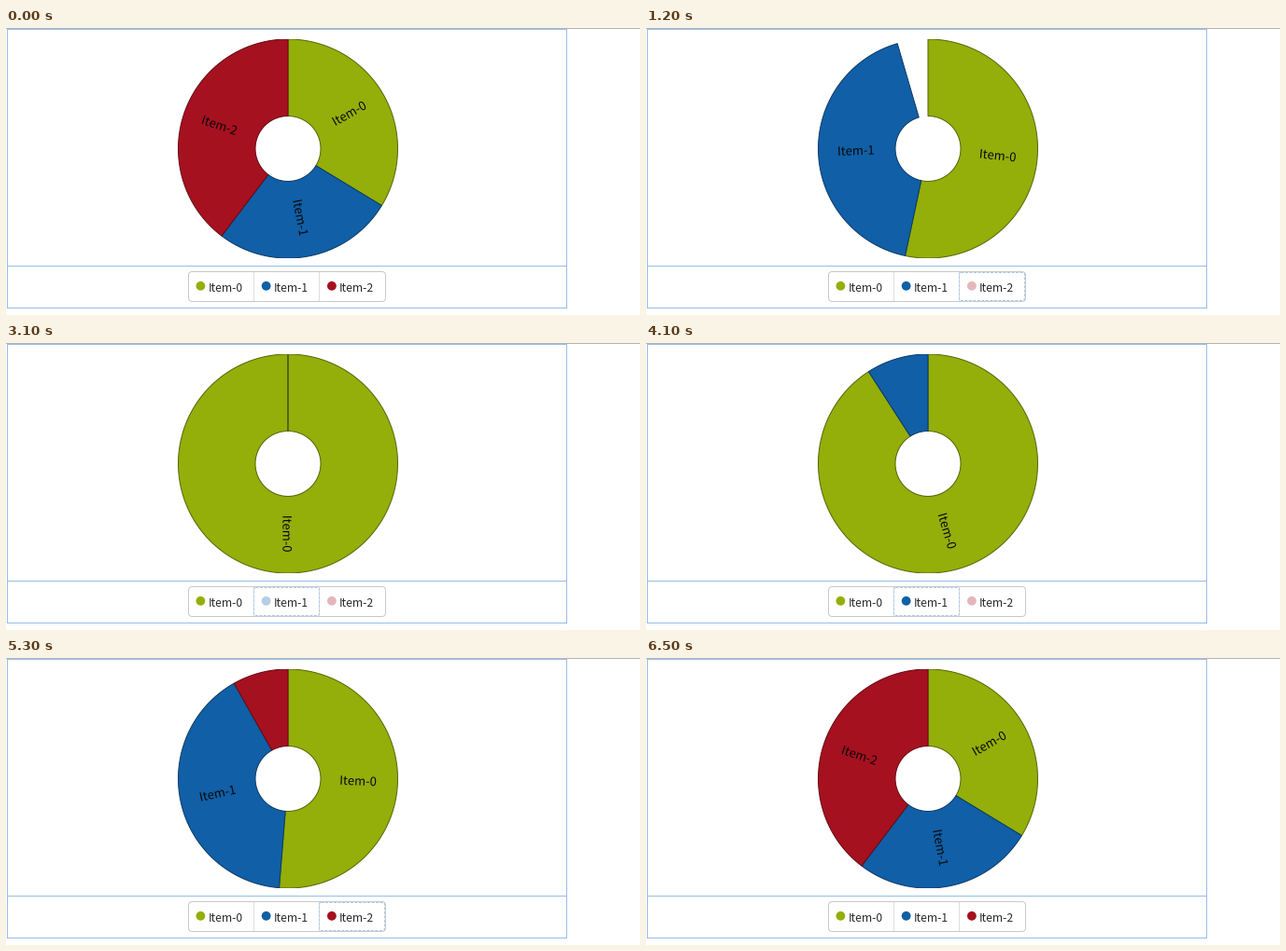
Write a matplotlib script that moves like this. It is 679 by 308 pixels and loops after 6.6 s.

```python
import numpy as np
import matplotlib.pyplot as plt
from matplotlib.animation import FuncAnimation
from matplotlib.patches import Circle, FancyBboxPatch, PathPatch, Polygon, Rectangle
from matplotlib.textpath import TextPath
from matplotlib.transforms import Affine2D

W, H, DPI = 679, 308, 64
STEP, LOOP = 100, 6600
PX = 72 / DPI  # points per pixel

CX, CY = 302, 129.5
R_IN, R_OUT = 35, 117.5
R_MID, R_CALLOUT = (R_IN + R_OUT) / 2, R_OUT + 40

BLUE = "#99bce8"
COLORS = ["#94ae0a", "#115fa6", "#a61120"]
EDGES = ["#566606", "#0b3a66", "#650a14"]
NAMES = ["Item-0", "Item-1", "Item-2"]
SWEEPS = [121.3, 95.9, 142.8]
FONT = "Noto Sans CJK JP"


def ends(count):
    """End angle of each slice, clockwise from the top, with `count` shown."""
    sums = np.cumsum(SWEEPS[:count])
    return np.append(sums * 360 / sums[-1], [360.0] * (3 - count))


# start ms, slices before, slices after, first phase, phase per step
MOVES = [
    (900, 3, 2, 0.125, 0.21875),
    (2700, 2, 1, 0.125, 0.21875),
    (4000, 1, 2, 0.1, 0.2),
    (5200, 2, 3, 0.1, 0.2),
]
# start ms, legend item that has the focus
FOCUS = [(0, None), (800, 2), (2600, 1), (5100, 2), (6500, None)]

plt.rcParams["toolbar"] = "None"
fig = plt.figure(figsize=(W / DPI, H / DPI), dpi=DPI, facecolor="white")
ax = fig.add_axes([0, 0, 1, 1])
ax.set_xlim(0, W)
ax.set_ylim(H, 0)
ax.axis("off")


def line(xs, ys, color, z=5):
    ax.plot(xs, ys, color=color, lw=PX, zorder=z, snap=False,
            solid_capstyle="butt")


def rounded(x0, y0, x1, y1, r, color, z, **kw):
    box = FancyBboxPatch((x0, y0), x1 - x0, y1 - y0, fc="none", ec=color,
                         boxstyle=f"round,pad=0,rounding_size={r}",
                         lw=PX, zorder=z, snap=False, **kw)
    return ax.add_patch(box)


# panel borders
line([1.5, 1.5], [1, 301], BLUE)
line([600.5, 600.5], [1, 301], BLUE)
line([1, 601], [300.5, 300.5], BLUE)
line([2, 600], [255.5, 255.5], BLUE)
line([1, 601], [1.5, 1.5], BLUE, 9)
line([0, W], [0.5, 0.5], "#b4b4b4", 9)

# legend
rounded(195.5, 261.5, 406.5, 293.5, 4, "#c8c8c8", 4)
dots, focus_boxes = [], []
for i, name in enumerate(NAMES):
    x = 195.5 + 70 * i
    if i:
        line([x, x], [262, 293], "#dedede", 3)
    dots.append(ax.add_patch(Circle((x + 12.9 + 0.25 * i, 276.8), 4.9,
                                    fc=COLORS[i], ec="none", zorder=4)))
    ax.text(x + 21.3, 282.8, name, fontname=FONT, fontsize=12.1 * PX,
            color="#2a2a2a", va="baseline", zorder=4)
    focus_boxes.append(rounded(x, 262.5, x + 70, 292.5, 2, "#a9cbea", 6,
                               linestyle=(0, (3, 1.5))))

# pie
slices = [ax.add_patch(Polygon([(0, 0), (1, 1), (1, 0)], closed=True, fc=c,
                               ec=e, lw=PX, joinstyle="miter", zorder=2,
                               snap=False))
          for c, e in zip(COLORS, EDGES)]
plot_area = Rectangle((2, CY - R_OUT), 598, 2 * R_OUT, transform=ax.transData)
for s in slices:
    s.set_clip_path(plot_area)


def label(name):
    """Text outline centred on the origin."""
    path = TextPath((0, 0), name, size=13, prop={"family": FONT})
    box = path.get_extents()
    shift = Affine2D().translate(-(box.x0 + box.x1) / 2, -(box.y0 + box.y1) / 2)
    return ax.add_patch(PathPatch(path.transformed(shift), fc="#080808",
                                  ec="none", zorder=7, snap=False))


labels = [label(n) for n in NAMES]


def polar(r, deg):
    a = np.radians(deg)
    return CX + r * np.sin(a), CY - r * np.cos(a)


def ring(a0, a1):
    a = np.linspace(a0, a1, 180)
    outer = np.column_stack(polar(R_OUT, a))
    inner = np.column_stack(polar(R_IN, a[::-1]))
    return np.vstack([outer, inner])


def place_label(patch, mid, callout):
    x, y = polar(R_MID + (R_CALLOUT - R_MID) * callout, mid)
    tilt = mid - 90 - (180 if mid > 180.01 else 0)
    move = Affine2D().scale(1, -1).rotate_deg(tilt * (1 - callout))
    patch.set_transform(move.translate(x - 0.8, y - 0.8) + ax.transData)


def pie_state(t):
    """End angles, number of slices, newcomer and its callout amount."""
    state = ends(3), 3, None, 0
    for start, before, after, first, rate in MOVES:
        if t >= start:
            u = min(1, first + rate * (t - start) / STEP)
            p = (1 - np.cos(np.pi * u)) / 2
            stops = ends(before) + (ends(after) - ends(before)) * p
            new = after - 1 if after > before else None
            callout = np.interp(u, [0.46, 0.5, 0.7, 0.85], [1, 0.9, 0.325, 0])
            state = stops, after, new, callout
    return state


def draw(k):
    t = k * STEP
    stops, count, new, callout = pie_state(t)
    focus = [item for start, item in FOCUS if t >= start][-1]
    a0 = 0
    for i in range(3):
        shown = i < count
        slices[i].set_visible(shown)
        labels[i].set_visible(shown)
        dots[i].set_alpha(1 if shown else 0.3)
        focus_boxes[i].set_visible(i == focus)
        if shown:
            slices[i].set_xy(ring(a0, stops[i]))
            place_label(labels[i], (a0 + stops[i]) / 2,
                        callout if i == new else 0)
        a0 = stops[i]
    return slices + labels + dots + focus_boxes


anim = FuncAnimation(fig, draw, frames=LOOP // STEP, interval=STEP,
                     init_func=lambda: draw(0), repeat=True, repeat_delay=0,
                     blit=False)
plt.show()
```
